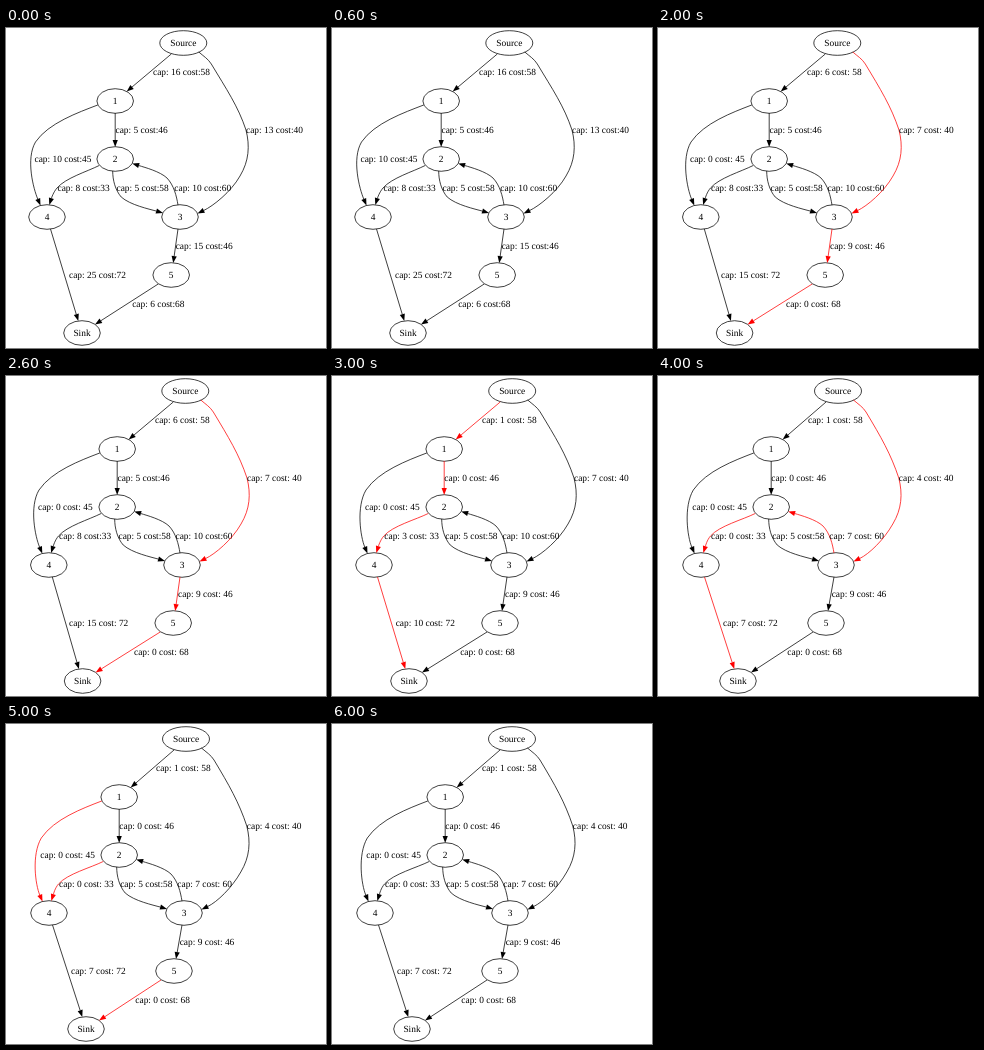
These frames come from a looping animation (320x320 px, 7 s). An HTML page:

```html
<!DOCTYPE html>
<html lang="en">
<head>
<meta charset="utf-8">
<title>Min-cost flow</title>
<style>
  html, body { margin: 0; width: 100%; height: 100%; overflow: hidden; background: #fff; }
  svg { display: block; width: 320px; height: 320px; }
  text { font: 9.42px "Liberation Serif", "Times New Roman", serif; text-rendering: geometricPrecision; }
  ellipse, .line { fill: none; stroke: #000; stroke-width: .75; }
  .hot .line { stroke: #f00; }
  .hot .head { fill: #f00; }
  .node text { text-anchor: middle; }
</style>
</head>
<body>
<svg viewBox="0 0 320 320"></svg>
<script>
const STEP = 1000, STEPS = 7;
const svg = document.querySelector('svg');

const nodes = [
  { name: 'Source', y: 15,  rx: 23.5, x: [177.3, 178.3, 179.3, 180.2, 180] },
  { name: '1',      y: 73,  rx: 18.3, x: [109.2, 110.2, 111.2, 112.2, 113.2] },
  { name: '2',      y: 131, rx: 18.3, x: [109.2, 110.2, 111.2, 112.2, 113.2] },
  { name: '3',      y: 189, rx: 18.3, x: [174, 174.8, 176, 177, 178] },
  { name: '4',      y: 189, rx: 18.3, x: [41, 41.6, 42.8, 42, 43] },
  { name: '5',      y: 247, rx: 18.3, x: [165.2, 166.2, 167.2, 168, 168] },
  { name: 'Sink',   y: 305, rx: 18.3, x: [76, 75.6, 76.6, 77, 80] }
];

// at: label x per step; cap: capacity per step; hot: steps drawn in red;
// path: points from tail a to tip b, bending around label x l.
const edges = [
  { from: 0, to: 1, cost: 58, y: 44, at: [147, 148, 149, 150, 150], cap: [16, 6, 6, 1, 1], hot: [1, 3],
    path: (a, b) => [[a - 12, 26], [b + 11.5, 63.5]] },
  { from: 1, to: 2, cost: 46, y: 102, at: [109.5, 110.5, 111.5, 112.3, 113.3], cap: [5, 5, 5, 0, 0], hot: [3],
    path: (a, b) => [[a, 85], [b, 119]] },
  { from: 1, to: 4, cost: 45, y: 131, at: [28.5, 31, 32, 33, 34.3], cap: [10, 0, 0, 0, 0], hot: [1, 5],
    path: (a, b, l) => [[a - 17.5, 77], [a - 37, 84.5], [l + 14, 95], [l + 1, 114],
      [l - 9, 131], [b - 13.5, 161], [b - 6.5, 177.5]] },
  { from: 2, to: 4, cost: 33, y: 160, at: [51.5, 51.8, 53, 52.3, 53], cap: [8, 8, 8, 3, 0], hot: [3, 4, 5],
    path: (a, b, l) => [[a - 16, 137.5], [a - 28, 143.5], [l + 8, 150], [l - .5, 160],
      [l - 4, 164], [b + 4.5, 170], [b + 2.3, 177]] },
  { from: 2, to: 3, cost: 58, y: 160, at: [110.5, 111.5, 112.5, 113.3, 114.2], cap: [5, 5, 5, 5, 5], hot: [],
    path: (a, b) => [[a - 2.5, 143], [a - 2.5, 152], [a, 162], [a + 6, 169],
      [a + 15, 177], [b - 31, 181], [b - 17, 185]] },
  { from: 3, to: 2, cost: 60, y: 160, at: [168.3, 168.5, 169.5, 170.5, 171.3], cap: [10, 10, 10, 10, 7], hot: [4],
    path: (a, b) => [[a - 2, 177], [a - 3.5, 168], [a - 6, 157.5], [a - 13, 150],
      [a - 20, 143.5], [b + 30, 139.5], [b + 17, 135.5]] },
  { from: 0, to: 3, cost: 40, y: 102, at: [240, 239.7, 241, 242, 240.8], cap: [13, 13, 7, 7, 4], hot: [2, 4],
    path: (a, b, l) => [[a + 15.5, 24], [a + 20, 28], [a + 25, 31], [a + 28, 36],
      [a + 43, 61], [l - 8, 78], [l, 102], [l + 4, 118], [l + 3, 133], [l - 6, 148],
      [l - 15, 164], [b + 33, 178], [b + 17.5, 185.5]] },
  { from: 3, to: 5, cost: 46, y: 218, at: [169.7, 171, 172, 173, 173.7], cap: [15, 15, 9, 9, 9], hot: [2],
    path: (a, b) => [[a - 2, 201], [b + 2, 235]] },
  { from: 4, to: 6, cost: 72, y: 247, at: [63, 62.5, 63, 63.7, 65], cap: [25, 15, 15, 10, 7], hot: [1, 3, 4],
    path: (a, b) => [[a + 3.5, 201], [b - 3.7, 293]] },
  { from: 5, to: 6, cost: 68, y: 276, at: [126.2, 126.7, 128, 128.2, 129.3], cap: [6, 6, 0, 0, 0], hot: [2, 5],
    path: (a, b) => [[a - 13, 256], [b + 13, 296.5]] }
];

function add(parent, tag, attrs = {}) {
  const el = document.createElementNS('http://www.w3.org/2000/svg', tag);
  for (const key in attrs) el.setAttribute(key, attrs[key]);
  return parent.appendChild(el);
}

for (const n of nodes) {
  n.group = add(svg, 'g', { class: 'node' });
  add(n.group, 'ellipse', { cy: n.y, rx: n.rx, ry: 12.3 });
  add(n.group, 'text', { y: n.y + 3 }).textContent = n.name;
}
for (const e of edges) {
  e.group = add(svg, 'g');
  e.line = add(e.group, 'path', { class: 'line' });
  e.head = add(e.group, 'path', { class: 'head' });
  e.text = add(e.group, 'text', { y: e.y + 3 });
}

function drawEdge(e, step, pose) {
  const pts = e.path(nodes[e.from].x[pose], nodes[e.to].x[pose], e.at[pose]);
  const [tx, ty] = pts.pop();
  const [px, py] = pts[pts.length - 1];
  const len = Math.hypot(tx - px, ty - py);
  const ux = (tx - px) / len, uy = (ty - py) / len;
  const bx = tx - ux * 7, by = ty - uy * 7;
  const wx = -uy * 2.6, wy = ux * 2.6;
  const [start, ...rest] = [...pts, [bx, by]];
  e.line.setAttribute('d', `M${start}${rest.length > 1 ? 'C' : 'L'}${rest.join(' ')}`);
  e.head.setAttribute('d', `M${tx},${ty}L${bx + wx},${by + wy} ${bx - wx},${by - wy}Z`);
  const gap = e.cap[pose] === e.cap[0] ? '' : ' ';
  e.text.textContent = `cap: ${e.cap[pose]} cost:${gap}${e.cost}`;
  e.text.setAttribute('x', e.at[pose]);
  e.group.setAttribute('class', e.hot.includes(step) ? 'hot' : '');
}

function draw(step) {
  const pose = Math.min(step, 4);
  for (const n of nodes) n.group.setAttribute('transform', `translate(${n.x[pose]} 0)`);
  for (const e of edges) drawEdge(e, step, pose);
}

let shown = 0;
const begin = performance.now();
function tick() {
  const step = Math.floor((performance.now() - begin) / STEP) % STEPS;
  if (step !== shown) draw(shown = step);
  requestAnimationFrame(tick);
}
draw(0);
requestAnimationFrame(tick);
</script>
</body>
</html>
```
